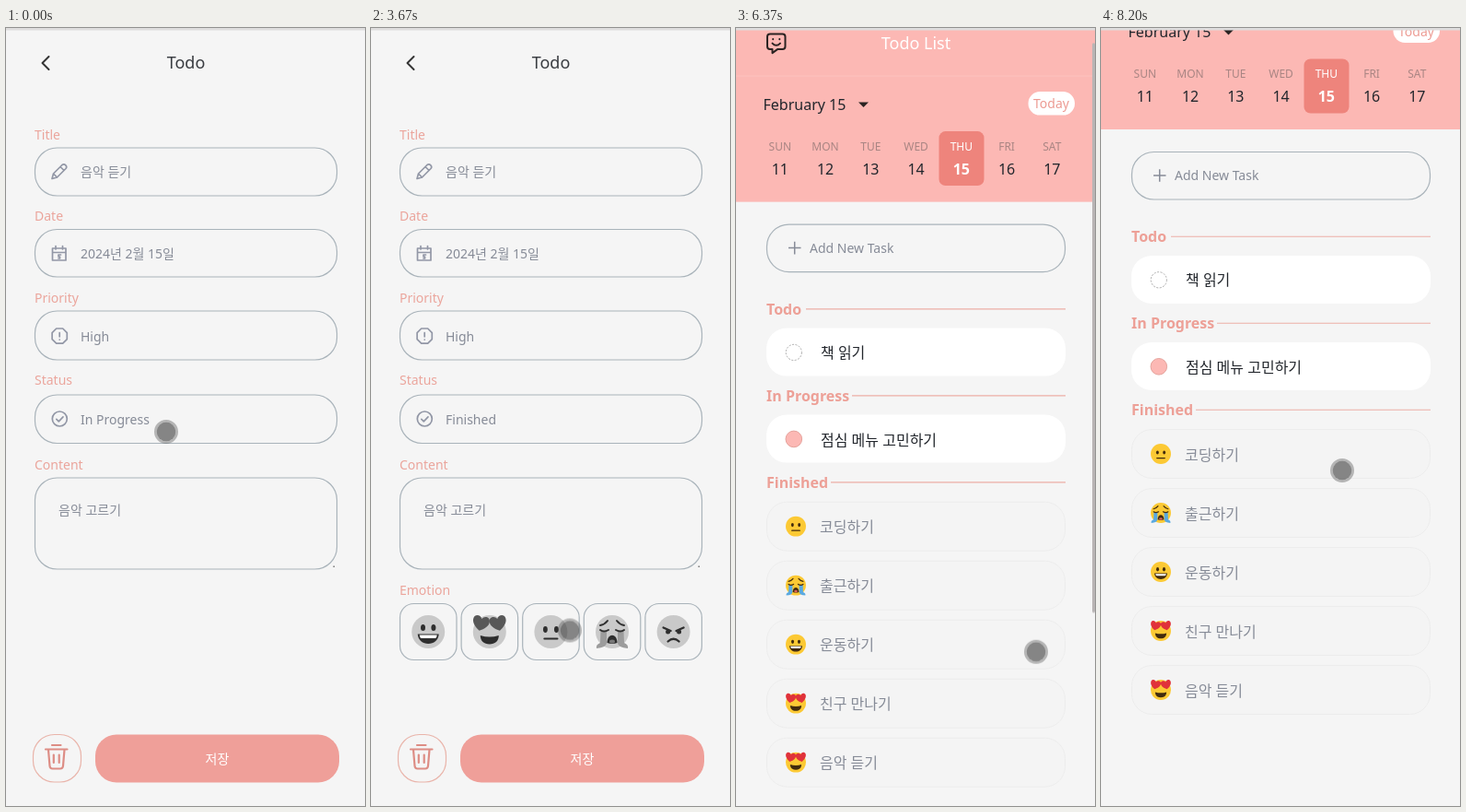
Animation, 390 px wide and 844 px high, one loop 8.26 s. Source, as an HTML page:

```html
<!DOCTYPE html>
<html lang="ko">
<head>
<meta charset="utf-8">
<title>Todo</title>
<style>
html, body { margin: 0; width: 100%; height: 100%; overflow: hidden; background: #f5f5f5; }
svg { display: block; }
text { font: 500 14px "Noto Sans", "Noto Sans CJK KR", sans-serif; fill: #868b97; white-space: pre; }
.label { fill: #eba59c; }
.mid { text-anchor: middle; }
.title { font-size: 18px; font-weight: 400; }
.big { font-size: 16px; }
.ink { fill: #22262c; }
.white { fill: #fff; }
.head { font-size: 16px; font-weight: 600; fill: #eda097; }
.wd { font-size: 12px; font-weight: 400; fill: #a98583; }
.box { fill: none; stroke: #a9b3ba; stroke-width: 1.2; }
.pink { fill: #f5f5f5; stroke: #e9b4aa; stroke-width: 1.2; }
.icon { fill: none; stroke: #9297a6; stroke-width: 1.7; stroke-linecap: round; stroke-linejoin: round; }
.gray { filter: grayscale(1); }

.form, .home, .empty, .tasks, .open, .before, .after, .emotion { animation: 8260ms step-end infinite; }
.form { animation-name: form; }
.home { animation-name: home; }
.empty { animation-name: empty; }
.tasks { animation-name: tasks; }
.open { animation-name: open; }
.before { animation-name: before; }
.after, .emotion { animation-name: after; }
.love { animation: love 8260ms step-end infinite; }
.page { animation: scroll 8260ms linear infinite; }
.thumb { animation: thumb 8260ms linear infinite, bar 8260ms linear infinite; }
.dot { animation: dot 8260ms linear infinite, blink 8260ms step-end infinite; }

@keyframes form { 0% { opacity: 1 } 66.59%, 100% { opacity: 0 } }
@keyframes home { 0% { opacity: 0 } 66.59%, 100% { opacity: 1 } }
@keyframes empty { 0% { opacity: 1 } 68.16%, 100% { opacity: 0 } }
@keyframes tasks { 0% { opacity: 0 } 68.16%, 100% { opacity: 1 } }
@keyframes open { 0% { opacity: 0 } 1.21% { opacity: 1 } 10.9%, 100% { opacity: 0 } }
@keyframes before { 0% { opacity: 1 } 1.21%, 100% { opacity: 0 } }
@keyframes after { 0% { opacity: 0 } 10.9%, 100% { opacity: 1 } }
@keyframes love { 0% { filter: grayscale(1) } 59.32%, 100% { filter: none } }
@keyframes scroll {
  0%, 76.4% { transform: translateY(0) }
  78.69% { transform: translateY(-67px); animation-timing-function: cubic-bezier(.1, .6, .3, 1) }
  86.32%, 100% { transform: translateY(-100px) }
}
@keyframes thumb {
  0%, 76.4% { transform: translateY(0) }
  78.69% { transform: translateY(49px); animation-timing-function: cubic-bezier(.1, .6, .3, 1) }
  86.32%, 100% { transform: translateY(73px) }
}
@keyframes bar { 0%, 76.4% { opacity: 0 } 76.7%, 86.6% { opacity: 1 } 88.74%, 100% { opacity: 0 } }
@keyframes blink { 0% { opacity: 1 } 29.06% { opacity: 0 } 37.89%, 100% { opacity: 1 } }
@keyframes dot {
  0%, 7.26% { transform: translate(174px, 438px) }
  10.05%, 18.7% { transform: translate(172px, 558px) }
  20.58%, 22.28% { transform: translate(322px, 464px) }
  23%, 29.06% { transform: translate(366px, 475px) }
  29.1%, 37.89% { transform: translate(376px, 524px) }
  39.59%, 41.16% { transform: translate(312px, 588px) }
  42.01%, 44.42% { transform: translate(214px, 653px) }
  44.43%, 48.05% { transform: translate(216px, 653.5px) }
  48.06%, 50.12% { transform: translate(166px, 663px) }
  51.21%, 60.17% { transform: translate(123px, 666px) }
  63.56%, 69.01% { transform: translate(187px, 797px) }
  73.49%, 76.4% { transform: translate(340px, 701px) }
  78.69% { transform: translate(296px, 625px); animation-timing-function: cubic-bezier(.1, .6, .3, 1) }
  86.32%, 98.55% { transform: translate(243px, 588px) }
  99.27%, 100% { transform: translate(262px, 480px) }
}
</style>
</head>
<body>
<svg width="390" height="844" viewBox="0 0 390 844">
  <defs>
    <circle id="face" r="18" fill="#fcc934"/>
    <g id="grin">
      <use href="#face"/>
      <g fill="#422b0d"><ellipse cx="-5.7" cy="-4.5" rx="2.5" ry="3.5"/><ellipse cx="5.7" cy="-4.5" rx="2.5" ry="3.5"/>
      <path d="M-11.5 2.5H11.5C11 9 6 13 0 13S-11 9-11.5 2.5Z"/></g>
      <path d="M-9.5 3.5H9.5Q9 7 7.5 7H-7.5Q-9 7-9.5 3.5Z" fill="#fff"/>
    </g>
    <path id="heart" d="M0 8C-5 5-9.500 1-9-4C-8.500-9-2-9.500 0-5C2-9.500 8.500-9 9-4C9.500 1 5 5 0 8Z" fill="#e0323a"/>
    <g id="hearts">
      <use href="#face"/>
      <use href="#heart" transform="translate(-9.500 -9) rotate(12)"/>
      <use href="#heart" transform="translate(9.500 -9) rotate(-12)"/>
      <path d="M-10 4Q0 7 10 4C10 10 6 13.500 0 13.500S-10 10-10 4Z" fill="#422b0d"/>
    </g>
    <g id="flat">
      <use href="#face"/>
      <g fill="#422b0d"><ellipse cx="-6" cy="-2.5" rx="2.4" ry="3.4"/><ellipse cx="6" cy="-2.5" rx="2.4" ry="3.4"/></g>
      <path d="M-7 7.500H7" stroke="#422b0d" stroke-width="2.2" stroke-linecap="round"/>
    </g>
    <g id="sob">
      <use href="#face"/>
      <path d="M-12.500-1H-6V12Q-6 17-17 18Q-18 14-13 12ZM12.500-1H6V12Q6 17 17 18Q18 14 13 12Z" fill="#5aa9e0"/>
      <path d="M-13-2Q-9 1-4-2M13-2Q9 1 4-2M-13-7Q-8-8-5-12M13-7Q8-8 5-12" fill="none" stroke="#422b0d" stroke-width="2" stroke-linecap="round"/>
      <path d="M-5.500 12C-5.500 1 5.500 1 5.500 12Q0 14-5.500 12Z" fill="#422b0d"/>
      <ellipse cy="10.500" rx="3" ry="2" fill="#d9605a"/>
    </g>
    <g id="angry">
      <use href="#face"/>
      <g fill="#422b0d"><circle cx="-6" cy="0" r="2.500"/><circle cx="6" cy="0" r="2.500"/></g>
      <path d="M-11-4.500L-3-1M11-4.500L3-1M-6 10.500Q0 5 6 10.500" fill="none" stroke="#422b0d" stroke-width="2.300" stroke-linecap="round"/>
    </g>
    <path id="star" d="M0-8Q1-1 7 0Q1 1 0 8Q-1 1-7 0Q-1-1 0-8Z" fill="#f9bf35"/>
    <g id="sparkles">
      <use href="#star" x="2.500"/>
      <use href="#star" transform="translate(-5.500 -4) scale(.48)"/>
      <use href="#star" transform="translate(-4.500 5.500) scale(.48)"/>
    </g>
  </defs>

  <rect width="390" height="844" fill="#f5f5f5"/>

  <g class="form">
    <path d="M46.500 31L39.500 38L46.500 45" fill="none" stroke="#333" stroke-width="2" stroke-linecap="round" stroke-linejoin="round"/>
    <text class="title mid" x="195.500" y="44" style="fill:#3a3d42">Todo</text>
    <g id="fields"></g>
    <text x="81" y="161">음악 듣기</text>
    <text x="81" y="249.500">2024년 2월 15일</text>
    <text x="81" y="339.500">High</text>
    <text class="before" x="81" y="429.500">In Progress</text>
    <text class="after" x="81" y="429.500">Finished</text>
    <text x="57" y="528">음악 고르기</text>
    <rect x="355.500" y="583.500" width="1.500" height="1.500" fill="#777"/>

    <g class="icon">
      <path d="M50 163.500L51.500 158L61 148.500Q63 147 64.800 148.800T65 152.500L55.500 162ZM59 150.500L63 154.500M51.500 158L55.500 162"/>
      <path d="M50.500 239H65V252H50.500ZM50.500 243.500H65M54 236.500V240M61.500 236.500V240M59.500 246H57V248H58.500V250H57"/>
      <path d="M54.700 326H61.700L66.300 330.600V337.600L61.700 342.200H54.700L50.100 337.600V330.600ZM58.200 330.500V334.800M58.200 338V338.100"/>
      <circle cx="58.300" cy="424" r="8"/>
      <path d="M54.800 424.300L57.300 426.800L62 421.800"/>
    </g>

    <g class="emotion">
      <text class="label" x="31" y="614.500">Emotion</text>
      <g id="moods"></g>
    </g>

    <g class="open">
      <rect class="pink" x="31.500" y="398" width="328" height="52.500" rx="24" fill="none"/>
      <g class="icon"><circle cx="58.300" cy="424" r="8"/><path d="M54.800 424.300L57.300 426.800L62 421.800"/></g>
      <text class="ink" x="81" y="429.500">In Progress</text>
      <rect class="pink" x="32" y="451.500" width="326.500" height="129" rx="7"/>
      <path d="M33 495H358M33 537H358" stroke="#e9b4aa" stroke-dasharray="2 1.500"/>
      <text class="ink" x="48" y="479">Not Started</text>
      <text class="ink" x="48" y="521">In Progress</text>
      <text class="ink" x="48" y="563">Finished</text>
    </g>

    <rect class="pink" x="29.500" y="766.500" width="52" height="51.500" rx="23"/>
    <path d="M43 782.500H66.500M50 778H59.500M46 783L47.500 800.500Q47.800 803.500 50.500 803.500H59Q61.700 803.500 62 800.500L63.500 783M51.800 788.500V797M57.700 788.500V797" fill="none" stroke="#dd8d85" stroke-width="2.200" stroke-linecap="round"/>
    <rect x="97" y="766.500" width="265" height="52" rx="23" fill="#ef9f99"/>
    <text class="white mid" x="229.500" y="798">저장</text>
  </g>

  <g class="home">
    <rect width="390" height="844" fill="#f5f5f5"/>
    <g class="page">
      <rect width="390" height="210" fill="#fcb8b4"/>
      <path d="M0 73.500H390" stroke="#fdc3bf"/>
      <g fill="none" stroke="#2b2322" stroke-width="2" stroke-linecap="round" stroke-linejoin="round">
        <path d="M37 28H50.500Q53.500 28 53.500 31V41.500Q53.500 44.500 50.500 44.500H45L39.500 48.500V44.500H37Q34 44.500 34 41.500V31Q34 28 37 28Z"/>
        <path d="M39.500 38Q43.800 42.500 48 38M40.200 33.500V33.600M47.300 33.500V33.600"/>
      </g>
      <text class="title mid white" x="195.500" y="44">Todo List</text>
      <text class="big ink" x="29.500" y="110">February 15</text>
      <path d="M133 102H144L138.500 107.500Z" fill="#2b2322"/>
      <rect x="317.500" y="90.500" width="50.500" height="25.500" rx="12.700" fill="#fff"/>
      <text class="mid" x="342.500" y="108.500" style="fill:#ec9a92">Today</text>
      <rect x="220.500" y="133.500" width="49" height="59" rx="7" fill="#ee847c"/>
      <g id="days"></g>
      <rect class="box" x="33.500" y="234.500" width="324" height="51.500" rx="24"/>
      <path d="M57 260H70.500M63.700 253.200V266.800" stroke="#868b97" stroke-width="1.500"/>
      <text x="80" y="265">Add New Task</text>

      <g class="empty">
        <use href="#sparkles" x="122.500" y="330"/>
        <text class="ink mid" x="195.500" y="335.500" style="font-size:18px">할 일이 없어요</text>
        <use href="#sparkles" x="268" y="330"/>
      </g>

      <g class="tasks">
        <g id="heads"></g>
        <rect x="33" y="347" width="325" height="52" rx="22" fill="#fff"/>
        <circle cx="62.800" cy="373.300" r="8.600" fill="none" stroke="#aaa" stroke-dasharray="2 1.500"/>
        <text class="big ink" x="92" y="379.300">책 읽기</text>
        <rect x="33" y="441" width="325" height="52" rx="22" fill="#fff"/>
        <circle cx="62.800" cy="467.300" r="8.800" fill="#fcb8b4" stroke="#e5a39c"/>
        <text class="big ink" x="92" y="474">점심 메뉴 고민하기</text>
        <g id="done"></g>
      </g>
    </g>
    <rect class="thumb" x="387" y="0.500" width="3" height="618" rx="1.500" fill="#b9b5b5"/>
  </g>

  <rect width="390" height="2.500" fill="#dedddd"/>
  <g class="dot">
    <circle r="10.400" fill="#404040" fill-opacity=".62"/>
    <circle r="11.700" fill="none" stroke="#464646" stroke-opacity=".36" stroke-width="2.600"/>
  </g>
</svg>
<script>
const fill = (id, rows, draw) => {
  document.getElementById(id).innerHTML = rows.map(draw).join('');
};

fill('fields', [
  ['Title', 121, 130, 52], ['Date', 209, 218.5, 51.5], ['Priority', 298, 307, 53],
  ['Status', 387, 398, 52.5], ['Content', 478.5, 488, 99]
], ([name, base, top, h]) =>
  `<text class="label" x="31" y="${base}">${name}</text>
   <rect class="box" x="31.5" y="${top}" width="328" height="${h}" rx="24"/>`);

fill('moods', ['grin', 'hearts', 'flat', 'sob', 'angry'], (mood, i) => {
  const x = 62.2 + i * 66.6;
  return `<rect class="box" x="${x - 30.7}" y="624.5" width="61.5" height="61" rx="15"/>
    <g class="${mood === 'hearts' ? 'love' : 'gray'}"><use href="#${mood}" x="${x}" y="655"/></g>`;
});

fill('days', ['SUN', 'MON', 'TUE', 'WED', 'THU', 'FRI', 'SAT'], (day, i) => {
  const x = 47.8 + i * 49.25, on = i === 4;
  return `<text class="wd mid" x="${x}" y="154.3" ${on ? 'style="fill:#fff;font-weight:500"' : ''}>${day}</text>
    <text class="big mid ${on ? 'white' : 'ink'}" x="${x}" y="180" ${on ? 'style="font-weight:600"' : ''}>${11 + i}</text>`;
});

fill('heads', [['Todo', 326.3, 76], ['In Progress', 420.3, 126], ['Finished', 514.3, 103]], ([name, y, x]) =>
  `<text class="head" x="33" y="${y + 5.9}">${name}</text>
   <path d="M${x} ${y}H358" stroke="#ecaea6" stroke-width="1.1"/>`);

fill('done', [
  ['flat', '코딩하기'], ['sob', '출근하기'], ['grin', '운동하기'],
  ['hearts', '친구 만나기'], ['hearts', '음악 듣기']
], ([mood, name], i) => {
  const y = 562 + i * 64;
  return `<rect x="33.5" y="${y - 26.5}" width="324" height="53" rx="22" fill="#f4f4f4" stroke="#ececec"/>
    <use href="#${mood}" transform="translate(65 ${y}) scale(.61)"/>
    <text class="big" x="91" y="${y + 6.5}">${name}</text>`;
});
</script>
</body>
</html>
```
